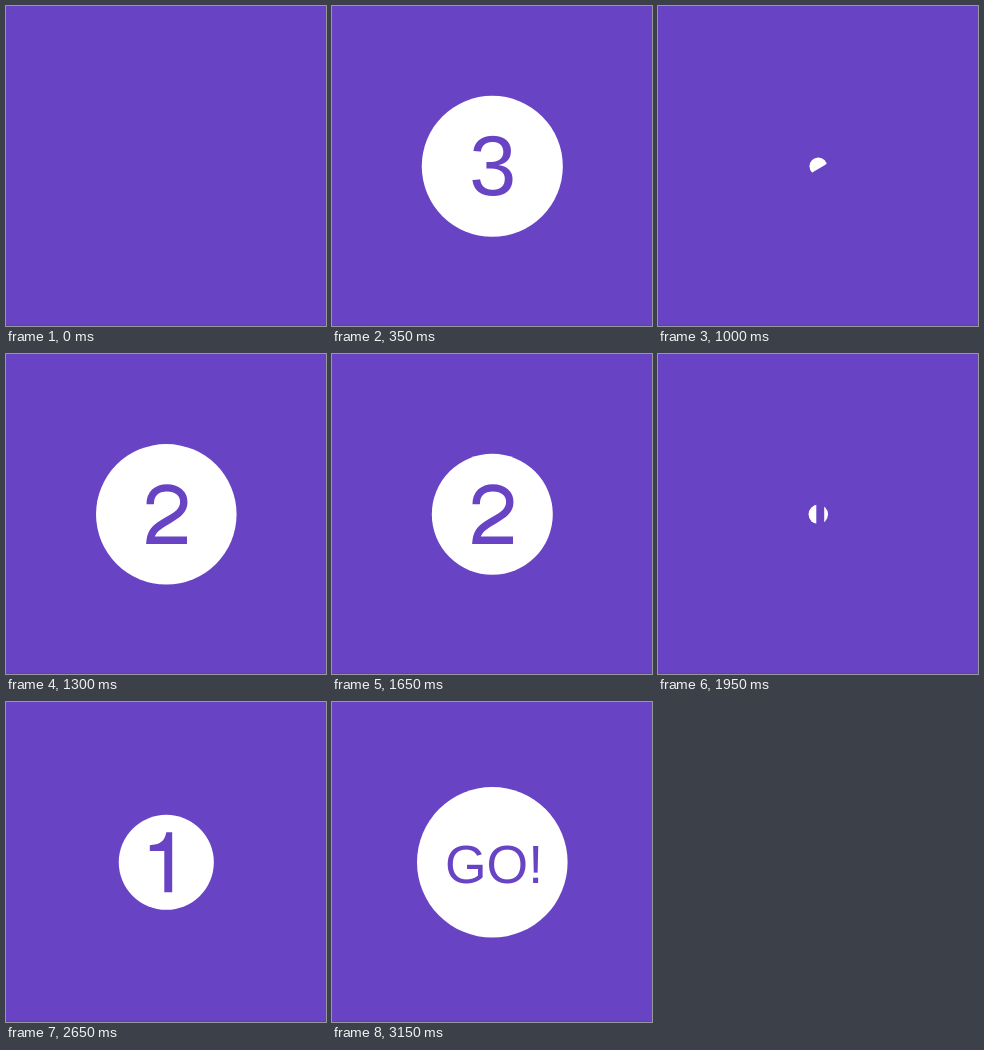
An HTML page with a canvas that plays this animation: 320 px wide and 320 px high, repeating every 3200 ms.

```html
<!DOCTYPE html>
<html lang="en">
<head>
<meta charset="utf-8">
<title>Countdown</title>
<style>
html, body { margin: 0; width: 100%; height: 100%; overflow: hidden; background: #6843c4; }
canvas { display: block; width: 320px; height: 320px; }
</style>
</head>
<body>
<canvas id="stage" width="320" height="320"></canvas>
<script>
const ctx = document.getElementById('stage').getContext('2d');
const LOOP = 3200, STEP = 50, BEAT = 947;
const PURPLE = '#6843c4';
const CENTER = 160.3;

// Circle radius over one beat: [ms, px]
const KEYS = [
  [0, 0], [252, 77.3], [309, 75.3], [354, 70.2], [425, 66.5],
  [602, 76.4], [703, 60.5], [751, 48.8], [BEAT, 0]
];

function secant(i) {
  const [a, b] = [KEYS[i], KEYS[i + 1]];
  return (b[1] - a[1]) / (b[0] - a[0]);
}

// Monotone tangent: flat at turning points
function tangent(i) {
  if (i === 0 || i === KEYS.length - 1) return 0;
  const p = secant(i - 1), q = secant(i);
  return p * q <= 0 ? 0 : 2 * p * q / (p + q);
}

function radius(t) {
  let i = 0;
  while (i < KEYS.length - 2 && t > KEYS[i + 1][0]) i++;
  const [t0, r0] = KEYS[i], [t1, r1] = KEYS[i + 1];
  const d = t1 - t0, u = (t - t0) / d, v = 1 - u;
  return r0 * (1 + 2 * u) * v * v + tangent(i) * d * u * v * v
       + r1 * (3 - 2 * u) * u * u - tangent(i + 1) * d * u * u * v;
}

function write(text, size, x, y) {
  ctx.font = size + 'px "Liberation Sans", Arial, sans-serif';
  ctx.textAlign = 'center';
  ctx.fillText(text, x, y);
}

// Numeral two with a wavy diagonal
const TWO = new Path2D(
  'M144.2 150.3 C144.2 139.5 151 133.9 161 133.9 C171 133.9 177.8 139.5 177.8 148 ' +
  'C177.8 157 171 161 162.5 166 C151 172.5 145.2 176.5 144.2 186.3 L181 186.3');

// Numeral one with a curved flag and no foot
const ONE = new Path2D(
  'M166.2 130.3 V190.2 H158.3 V148.9 H143.8 V143.2 C153.2 142.8 158.7 139.8 160.3 130.3 Z');

function drawTwo() {
  ctx.lineWidth = 7.4;
  ctx.stroke(TWO);
}

const LABELS = [
  () => write('3', 84.5, 160.8, 189.3),
  drawTwo,
  () => ctx.fill(ONE),
  () => write('GO!', 53.5, 162, 181)
];

function draw(t) {
  const n = Math.min(3, Math.floor(t / BEAT));
  ctx.fillStyle = PURPLE;
  ctx.fillRect(0, 0, 320, 320);
  ctx.fillStyle = '#fff';
  ctx.beginPath();
  ctx.arc(CENTER, CENTER, Math.max(0, radius(t - n * BEAT)), 0, Math.PI * 2);
  ctx.fill();

  ctx.fillStyle = ctx.strokeStyle = PURPLE;
  LABELS[n]();

  ctx.fillStyle = 'rgba(0, 0, 0, 0.07)';
  ctx.fillRect(0, 319, 320, 1);
}

const start = performance.now();
function tick(now) {
  const t = Math.max(0, now - start) % LOOP;
  draw(Math.floor(t / STEP) * STEP);
  requestAnimationFrame(tick);
}
draw(0);
requestAnimationFrame(tick);
</script>
</body>
</html>
```
